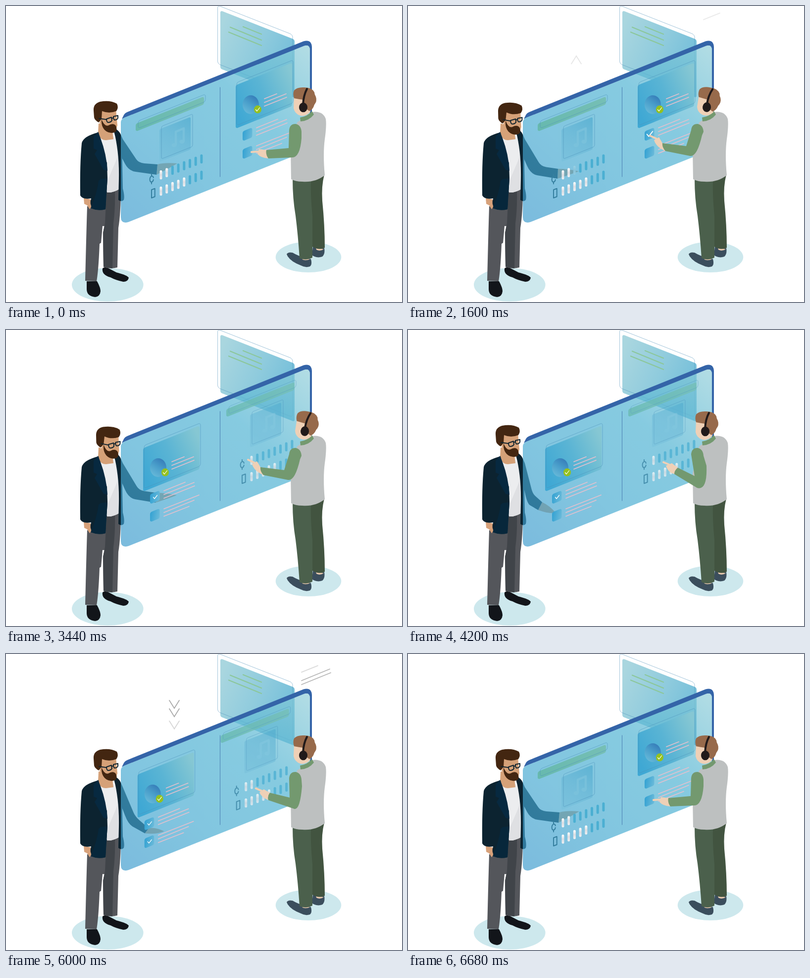
These frames come from a looping animation (800 by 600 pixels, 7000 ms). An HTML page:

```html
<!DOCTYPE html>
<html lang="en">
<head>
<meta charset="utf-8">
<title>Shared glass board</title>
<style>
html, body { margin: 0; width: 100%; height: 100%; overflow: hidden; background: #fff; }
svg { display: block; width: 800px; height: 600px; }
</style>
</head>
<body>
<svg id="stage" viewBox="0 0 800 600" fill="none"></svg>
<script>
const LOOP = 7000;
const stage = document.getElementById('stage');

// ---- markup helpers ----
const path = (d, fill, more = '') => `<path d="${d}" fill="${fill}" ${more}/>`;
const line = (d, color, width, more = '') =>
  `<path d="${d}" stroke="${color}" stroke-width="${width}" stroke-linecap="round" stroke-linejoin="round" ${more}/>`;
const slab = (x, y, w, h, r, more, tilt = -21.8) =>
  `<rect width="${w}" height="${h}" rx="${r}" transform="translate(${x} ${y}) skewY(${tilt})" ${more}/>`;
const oval = (x, y, rx, ry, fill) => `<ellipse cx="${x}" cy="${y}" rx="${rx}" ry="${ry}" fill="${fill}"/>`;
const grad = (id, dir, ...stops) => {
  const [x1, y1, x2, y2] = dir;
  return `<linearGradient id="${id}" x1="${x1}" y1="${y1}" x2="${x2}" y2="${y2}">` +
    stops.map((c, i) => `<stop offset="${i / (stops.length - 1)}" stop-color="${c}"/>`).join('') +
    '</linearGradient>';
};
const THIN = 'stroke="#4b8fb8" stroke-width=".8" stroke-opacity=".6"';
const CHECK = 'M-4,0 L-1.5,3 L4,-4';

// ---- board contents ----
function mixerCard(lit, id) {
  let s = slab(262, 238.5, 138, 16, 4, 'fill="url(#bar)"') +
    slab(267, 233, 136, 15, 4, THIN) +
    slab(310, 250, 63, 66, 3, 'fill="url(#photo)" opacity=".65"') +
    slab(314, 244, 63, 66, 3, THIN) +
    '<g opacity=".75">' + line('M343,281 V255 L359,248 V274', '#7cc3dc', 4.5) +
    oval(339.5, 282, 5, 4, '#7cc3dc') + oval(355.5, 275, 5, 4, '#7cc3dc') + '</g>' +
    line('M297.8,348 C297,342.5 291,344 290.6,351.5 C290.6,359 296.5,358 297.8,352 M294,341 V344.5 M294,356.5 V360.5', '#357f9f', 2) +
    line('M294,372.5 L300.7,370 V386.5 L294,389 Z', '#357f9f', 2);
  for (let row = 0; row < 2; row++) {
    for (let i = 0; i < 8; i++) {
      const box = `x="${310.5 + 11.7 * i}" y="${333 + 33 * row - 4.6 * i}" width="5" height="18.5" rx="2.5"`;
      const white = i < (row ? 5 : lit);
      s += `<rect ${box} fill="${white ? 'url(#lit)' : '#4bafd2'}"/>`;
      if (!row && i === lit) s += `<rect id="${id}" ${box} fill="url(#lit)" opacity="0"/>`;
    }
  }
  return s;
}

function listCard(live) {
  const pink = 'M522,188 L547,178 M522,195.5 L566,178 M522,203 L567,185 ' +
    'M506,247 L549,229.5 M506,254.5 L567,230 M506,262 L568,237 ' +
    'M506,283.5 L577,255.5 M506,291 L567,266 M506,298.5 L557,278.5';
  const mark = (id, y) => live ? `<g id="${id}" data-y="${y}" opacity="0">${line(CHECK, '#fff', 1.3)}</g>` : '';
  return slab(464, 160.5, 114, 88, 4, 'fill="url(#card)"') +
    slab(466, 155, 114, 87, 4, THIN) +
    oval(494.5, 200, 16.5, 19, 'url(#disc)') +
    oval(508.5, 209.6, 7.5, 8, '#95c11f') +
    line(CHECK, '#fff', 1.2, 'transform="translate(508.5 210)"') +
    line(pink, '#e4c0cd', 1.7) +
    slab(478, 254, 19.5, 20, 4, 'fill="url(#box)"') +
    slab(478, 290.5, 19.5, 20, 4, 'fill="url(#box)"') +
    mark('check1', 260) + mark('check2', 296.5);
}

// ---- scenery ----
const GLASS = 'M232,236 Q232,229 240,226 L602,81 Q614,77 614,90 V291 L247,438 Q232,442 232,428 Z';

const defs = '<defs>' +
  grad('glass', [0, 1, 1, 0], '#3d9bcd', '#47abd1', '#4db2d2', '#8fcdd8') +
  grad('back', [0, .3, 1, .6], '#a9d6df', '#8fcbdd', '#6fbcd9') +
  grad('bar', [0, 0, 1, 0], '#67b9ae', '#76bfb5') +
  grad('photo', [0, 1, 1, 0], '#79c1dc', '#68b7d6', '#4ba8cd') +
  grad('card', [0, .6, 1, .3], '#3fa8d4', '#5ab4d4', '#86c7d3') +
  grad('disc', [.8, 0, .2, 1], '#3479b7', '#4a9fcb', '#69bbda') +
  grad('box', [0, .4, 1, .6], '#36a3d3', '#68b9d9') +
  grad('lit', [0, 0, 0, 1], '#ffffff', '#dcdde2', '#eef1f4') +
  `<clipPath id="pane"><path d="${GLASS}"/></clipPath></defs>`;

const backCard =
  slab(433, 9, 150, 118, 4, 'fill="url(#back)"', 21.5) +
  slab(427.6, -1.5, 151.4, 118.5, 5, THIN, 21.5) +
  line('M479,42 L516,57 M453,43 L516,69 M450,53 L516,80', '#8cc79b', 2.2);

const leftBody =
  oval(205.3, 565, 72.3, 34, '#cde8ed') +
  path('M163,558 H184 Q191,571 191,578 Q190,589 180,590 Q163,588 163,574 Z', '#12151a') +
  path('M195,532 Q199,528 206,531 L223,540 Q246,546 248,551 Q246,559 237,559 Q222,556 211,550 Q193,545 195,532 Z', '#12151a') +
  path('M164,406 L204,400 L200,446 L195,446 L192,480 L189,482 Q187,535 183,558 L160,557 Q162,470 164,406 Z', '#54565b') +
  path('M203,376 L232,368 Q232,420 227,450 L225,530 Q210,534 197,529 L196,460 L200,440 Z', '#54565b') +
  path('M203,377 L220,374 Q221,410 217,440 L215,532 L197,529 L196,460 L200,440 Z', '#404449') +
  path('M157,389 L171,392 L172,408 L169,412 L164,404 L158,401 Z', '#d7a17a') +
  path('M188,262 L217,262 L229,290 L229,371 Q216,379 204,378 Z', '#ecedef') +
  path('M226,305 L229,371 Q216,379 204,378 L206,352 Z', '#dfe0e3') +
  path('M187,238 L186,258 Q190,272 202,272 L217,270 L214,245 Z', '#d5a178') +
  path('M187,256 Q156,264 153,278 Q149,320 150,384 Q155,393 172,390 Q168,402 175,410 Q186,416 201,412 L205,349 L204,318 Q192,290 187,256 Z', '#0c2330') +
  path('M186,255 L191,268 Q203,300 205,334 L197,332 L179,300 L184,292 L177,289 L177,265 Z', '#072940') +
  path('M191,351 L205,349 L201,412 Q186,416 171,410 Q184,380 187,354 Z', '#07273b') +
  path('M216,247 Q231,252 234,275 L236,370 Q240,385 238,393 Q233,398 227,393 L228,350 Q229,290 216,247 Z', '#0c2330');

const leftHead = '<g id="headL">' +
  path('M188,212 L222,208 L225,242 Q222,254 207,254 Q192,248 189,236 Z', '#d5a178') +
  path('M177,212 Q176,198 190,194 Q210,190 224,198 Q228,206 223,213 Q208,219 194,213 L193,229 L187,236 Q179,231 178,226 Z', '#432611') +
  path('M193,230 Q199,245 207,242 Q217,236 222,243 Q226,252 220,256 Q208,260 199,251 Q192,243 193,230 Z', '#432611') +
  line('M188,228 L202,230 M203,229 L213,225.5 L214,232 Q212,236 206,236 Q203,235 203,229 Z M214,228 L217,226 M217,224 L226,222 L226,227 Q225,231 219,231 Q217,230 217,224 Z', '#12242e', 2) +
  '</g>';

const rightBody =
  oval(611, 509, 66.3, 31, '#cde8ed') +
  path('M567,503 Q570,498 579,500 Q594,509 616,513 Q619,524 614,528 Q605,531 596,526 Q572,517 567,503 Z', '#3b4e5d') +
  path('M620,487 L643,491 Q645,503 639,508 Q628,512 618,505 Z', '#3b4e5d') +
  path('M597,510 L614,513 Q607,517 599,514 Z M626,490 L642,493 Q634,498 627,494 Z', '#ebcbb0') +
  path('M610,352 L643,342 Q637,365 639,395 Q644,445 644,490 Q633,496 619,488 Z', '#425440') +
  path('M579,350 L616,354 Q615,385 619,425 L619,510 Q605,517 593,511 Q590,465 585,425 Q579,390 579,350 Z', '#4b604c') +
  path('M588,236 L618,215 Q640,212 646,229 Q648,242 644,270 Q640,300 644,343 Q625,358 599,356 Q584,356 576,351 L575,290 Z', '#bdc0c0') +
  path('M594,226 Q609,224 618,213 L622,220 Q612,233 595,234 Z', '#73996f');

const rightHead = '<g id="headR">' +
  path('M582,182 L581,207 Q583,218 594,222 Q606,225 615,214 L612,187 Z', '#efd0b6') +
  path('M582,187 Q579,178 582,171 Q588,164 603,165 Q618,165 623,175 Q623,179 626,184 Q629,193 623,200 Q620,210 613,213 L604,207 L600,190 Q592,189 582,187 Z', '#976a4b') +
  line('M608,168 Q601,181 600,200', '#211a1a', 4) + oval(600.5, 205.5, 8.5, 9.8, '#211a1a') +
  '</g>';

const three = (id, color, w) => [0, 1, 2].map(k =>
  `<path id="${id}${k}" stroke="${color}" stroke-width="${w}" stroke-linecap="round" opacity="0"/>`).join('');

stage.innerHTML = defs + backCard + leftBody +
  '<path id="handL" fill="#d5a178"/><path id="armL" fill="#0c2330"/>' + leftHead +
  path('M234,229 L238,221 Q240,217 245,215 L601,71.5 Q617,67 618,83 V295 H614 V90 Q614,77 602,81 L240,226 Z', '#3464a8') +
  path(GLASS, 'url(#glass)', 'opacity=".68"') +
  '<g clip-path="url(#pane)"><g id="strip">' +
  mixerCard(2, 'lit1') + listCard(true) +
  `<g transform="translate(370 -157)"><g id="nextMixer">${mixerCard(1, 'lit2')}</g>${listCard(false)}</g></g></g>` +
  line('M432.5,165 V346', '#4b7fb3', 1) +
  three('chev', '#aaa', 1.8) + three('dash', '#b4b4b4', 1.8) +
  rightBody + rightHead +
  '<path id="handR" fill="#efd0b6"/><path id="fingerR" stroke="#efd0b6" stroke-width="4" stroke-linecap="round"/>' +
  '<path id="armR" fill="#73996f"/>';

const el = {};
stage.querySelectorAll('[id]').forEach(n => el[n.id] = n);
const set = (id, name, value) => el[id].setAttribute(name, value);

// ---- poses ----
// left: upper elbow, upper wrist, lower wrist, lower elbow, knuckle, tip, palm
const LEFT = [
  [268, 318, 306, 321, 304, 342, 248, 334, 320, 317, 346, 319, 328, 330],
  [269, 325, 303, 330, 302, 350, 248, 341, 322, 330, 345, 335, 327, 342],
  [252, 332, 271, 349, 263, 365, 241, 352, 286, 356, 298, 370, 289, 374],
  [261, 330, 288, 354, 280, 364, 247, 345, 300, 351, 319, 360, 305, 367]
];
// right: outer arm, elbow bend, lower elbow, lower wrist, upper wrist, inner elbow, knuckle, tip, under finger, palm
const RIGHT = [
  [597, 268, 594, 308, 577, 307, 530, 309, 526, 292, 571, 288, 511, 290, 496, 296, 508, 300, 515, 308],
  [594, 262, 584, 306, 570, 304, 520, 294, 514, 278, 562, 284, 507, 266, 489, 263, 497, 272, 502, 287],
  [603, 275, 605, 326, 584, 320, 538, 292, 545, 279, 579, 296, 533, 270, 516, 268, 521, 275, 525, 289],
  [598, 268, 594, 318, 582, 314, 530, 296, 533, 281, 573, 291, 521, 274, 505, 272, 512, 280, 516, 290]
];

const clamp = x => Math.max(0, Math.min(1, x));
const span = (t, a, b) => clamp((t - a) / (b - a));
const ease = (t, a, b) => { const p = span(t, a, b); return p * p * (3 - 2 * p); };
const mix = (a, b, p) => a.map((v, i) => v + (b[i] - v) * p);

function armPose(poses, t) {
  const tap = 0.15 * Math.sin(Math.PI * (t < 4000 ? span(t, 1120, 1560) : span(t, 4600, 5080)));
  if (t < 3440) return mix(poses[0], poses[1], ease(t, 0, 760) + tap);
  if (t < 4200) return mix(poses[1], poses[2], ease(t, 3440, 4200));
  if (t < 5340) return mix(poses[2], poses[3], tap);
  const q = ease(t, 5340, 6680), via = 0.48;
  return q < via ? mix(poses[2], poses[3], q / via) : mix(poses[3], poses[0], (q - via) / (1 - via));
}

const pairs = flat => flat.flatMap((v, i) => i % 2 ? [] : [[v, flat[i + 1]]]);
const pt = p => p.map(v => v.toFixed(2)).join(',') + ' ';
// straight run to a corner, rounded on both sides of it
const bend = (from, corner, to, a, b) =>
  `L${pt(mix(from, corner, a))}Q${pt(corner)}${pt(mix(corner, to, b))}L${pt(to)}`;

function drawArms(t) {
  const [eu, wu, wl, ed, knuckle, tip, palm] = pairs(armPose(LEFT, t));
  set('armL', 'd', 'M217,247 Q229,252 232,261 L236,270 ' + bend([236, 270], eu, wu, .85, .3) +
    'L' + pt(wl) + bend(wl, ed, [230, 300], .75, .4) + 'L229,285 Z');
  set('handL', 'd', `M${pt(wu)}Q${pt(knuckle)}${pt(tip)}Q${pt(palm)}${pt(wl)}Z`);

  const [out, elbow, low, wd, wt, inner, top, point, under, heel] = pairs(armPose(RIGHT, t));
  const cuff = mix(wd, wt, .5);
  set('armR', 'd', `M572,252 Q573,239 585,239 Q596,241 597,255 L${pt(out)}Q${pt(elbow)}${pt(low)}` +
    `L${pt(wd)}Q${pt([cuff[0] - 4, cuff[1]])}${pt(wt)}L${pt(inner)}Z`);
  set('handR', 'd', `M${pt(wt)}L${pt(top)}L${pt(under)}Q${pt(heel)}${pt(wd)}Z`);
  set('fingerR', 'd', `M${pt(point)}L${pt(mix(top, under, .5))}`);
}

function drawMarks(t) {
  const up = t < 4000;
  const start = up ? 1520 : 5000, leave = up ? 2600 : 5880, dir = up ? -1 : 1;
  const rest = up ? [94, 111, 136] : [94, 111, 127.5];
  const lineY = [up ? 42 : 43.5, 54, 62], reach = [33, 57, 59], rise = [13.3, 23.5, 24];
  const put = (id, d, a, x) => { set(id, 'd', d); set(id, 'opacity', clamp(a * (1 - x) * (1 - x))); };
  const enter = k => [start + 160 * k, start + 160 * k + 280];
  const exit = k => [leave + 160 * k, leave + 160 * k + 400];
  for (let k = 0; k < 3; k++) {
    const m = 2 - k;
    const c = up ? k : m;
    const y = rest[k] + dir * (-9 * (1 - ease(t, ...enter(c))) + (up ? 50 : 38) * ease(t, ...exit(c)));
    put('chev' + k, up ? `M330,${y + 16} L340,${y} L350,${y + 16}` : `M330,${y} L340,${y + 16} L350,${y}`,
      span(t, ...enter(c)) * (up && k === 2 ? 0.45 : 1), span(t, ...exit(c)));
    const inK = up ? k : m, outK = up ? m : k;
    const z = lineY[k] - dir * (-18 * (1 - ease(t, ...enter(inK))) + 30 * ease(t, ...exit(outK)));
    put('dash' + k, `M597,${z} L${597 + reach[k]},${z - rise[k]}`, span(t, ...enter(inK)), span(t, ...exit(outK)));
  }
}

function drawCheck(id, t, at) {
  const size = 1.6 - 0.6 * ease(t, at, at + 600);
  set(id, 'transform', `translate(488.5 ${el[id].dataset.y}) scale(${size})`);
  set(id, 'opacity', span(t, at, at + 160));
}

function render(t) {
  const a = ease(t, 2600, 3400), b = ease(t, 5880, 6680);
  set('strip', 'transform', `translate(${-187 * a - 183 * b} ${79 * a + 78 * b})`);
  set('nextMixer', 'opacity', 0.75 + 0.25 * b);
  const tilt = ease(t, 0, 760) - ease(t, 3440, 4200);
  set('headL', 'transform', `translate(${2.8 * tilt} ${3 * tilt}) rotate(${2.5 * tilt} 203 262)`);
  set('headR', 'transform', `translate(${1.2 * tilt} 0) rotate(${6.5 * tilt} 605 222)`);
  set('lit1', 'opacity', span(t, 1480, 1760));
  set('lit2', 'opacity', span(t, 4980, 5260));
  drawCheck('check1', t, 1400);
  drawCheck('check2', t, 4900);
  drawArms(t);
  drawMarks(t);
}

const begin = performance.now();
function tick() {
  render((performance.now() - begin) % LOOP);
  requestAnimationFrame(tick);
}
tick();
</script>
</body>
</html>
```
